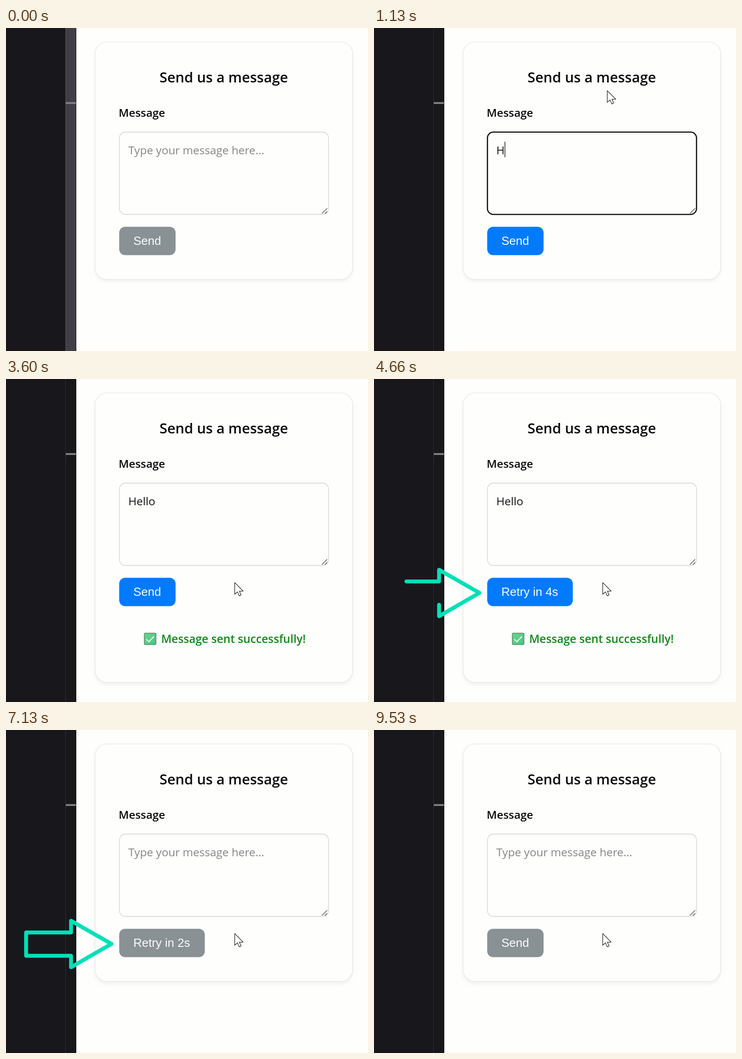
These frames come from a looping animation (793x706 px, 9600 ms). An HTML page with a canvas:

```html
<!DOCTYPE html>
<html lang="en">
<head>
<meta charset="utf-8">
<title>Send us a message</title>
<style>
  html, body { margin: 0; width: 100%; height: 100%; overflow: hidden; background: #fefefd; }
  canvas { display: block; }
</style>
</head>
<body>
<canvas id="stage" width="793" height="706"></canvas>
<script>
const ctx = document.getElementById('stage').getContext('2d');
const LOOP = 9600;
const UI = '"Open Sans", "Noto Sans", sans-serif';
const BUTTON_FONT = '26px "Liberation Sans", Arial, sans-serif';

const GREY = [138, 145, 149], BLUE = [0, 123, 255], DEEP = [0, 86, 179];
const FOCUS = 470, CLICK = 2530, SENT = 2600, CLEARED = 5665;
const RETRY = 3645, TICK = 1003;
const TYPED = [930, 1200, 1330, 1600, 1800];
const BUTTON_COLORS = [[930, BLUE], [2430, DEEP], [2670, BLUE], [CLEARED, GREY]];

// Pointer stops: time, x, y
const POINTER = [
  [30, -30, 300], [430, 440, 290], [500, 445, 285], [730, 511, 137],
  [2200, 511, 137], [2500, 362, 460], [2600, 364, 458], [2670, 371, 452], [3100, 501, 445]
];

const ARROW = [
  [142.5, 493.5], [142.5, 518.5], [231, 467.5], [142.5, 417],
  [142.5, 442.5], [44, 442.5], [44, 493.5]
];

const arrowPath = polygon(ARROW);
const arrowLength = ARROW.reduce((sum, p, i) => {
  const q = ARROW[(i + 1) % ARROW.length];
  return sum + Math.hypot(q[0] - p[0], q[1] - p[1]);
}, 0);
const arrowCursor = polygon([[0, 0], [0, 25.5], [6, 20.3], [10, 29], [14, 27.2], [10.3, 18.8], [18.5, 18.5]]);
const handCursor = new Path2D(
  'M-3 3Q-3 -1 0 -1Q3 -1 3 3V11Q6 9 7 13Q10 11 10 15Q13 13 13 17V24' +
  'Q12 34 4 34H0Q-5 33 -11 22Q-14 18 -11 17Q-8 16 -3 22Z');
const handLines = new Path2D('M3 11V17M7 13V18M10 15V19');

function polygon(points) {
  const path = new Path2D();
  points.forEach(([x, y]) => path.lineTo(x, y));
  path.closePath();
  return path;
}

const clamp = v => Math.min(1, Math.max(0, v));
const ease = v => 1 - Math.pow(1 - clamp(v), 2.35);
const smooth = v => v * v * (3 - 2 * v);

function rect(x, y, w, h, color) {
  ctx.fillStyle = color;
  ctx.fillRect(x, y, w, h);
}

function rounded(x, y, w, h, r) {
  ctx.beginPath();
  ctx.roundRect(x, y, w, h, r);
}

function text(str, x, y, font, color, align = 'left') {
  ctx.font = font;
  ctx.fillStyle = color;
  ctx.textAlign = align;
  ctx.fillText(str, x, y);
}

function line(x1, y1, x2, y2, color, width) {
  ctx.beginPath();
  ctx.moveTo(x1, y1);
  ctx.lineTo(x2, y2);
  ctx.strokeStyle = color;
  ctx.lineWidth = width;
  ctx.stroke();
}

function buttonColor(t) {
  let color = GREY;
  for (const [start, next] of BUTTON_COLORS) {
    if (t < start) break;
    const k = ease((t - start) / 200);
    color = color.map((c, i) => Math.round(c + (next[i] - c) * k));
  }
  return `rgb(${color})`;
}

function pointerAt(t) {
  if (t <= POINTER[0][0]) return null;
  const i = POINTER.findIndex(p => p[0] > t);
  if (i < 0) return POINTER[POINTER.length - 1].slice(1);
  const [t0, x0, y0] = POINTER[i - 1], [t1, x1, y1] = POINTER[i];
  const k = smooth((t - t0) / (t1 - t0));
  return [x0 + (x1 - x0) * k, y0 + (y1 - y0) * k];
}

function drawSidebar(t) {
  rect(0, 0, 154, 706, '#18171c');
  rect(130, 0, 1, 706, '#2f2f34');
  ctx.globalAlpha = clamp(1 - (t - 40) / 720);
  rect(130, 0, 24, 706, '#413f45');
  rect(130, 0, 1, 706, '#504e54');
  ctx.globalAlpha = 1;
  rect(153, 0, 1, 706, '#18171c');
  rect(131, 162, 22, 4, '#7d8285');
}

function drawCard(sent) {
  rounded(195, 30.5, 564.5, sent ? 632.5 : 519, 26);
  ctx.save();
  ctx.shadowColor = 'rgba(0,0,0,.05)';
  ctx.shadowBlur = 7;
  ctx.shadowOffsetY = 5;
  ctx.fillStyle = '#fefefd';
  ctx.fill();
  ctx.restore();
  ctx.strokeStyle = '#e3e3e3';
  ctx.lineWidth = 1.2;
  ctx.stroke();
  text('Send us a message', 477, 118.5, '600 31px ' + UI, '#0a0a0a', 'center');
  text('Message', 246.8, 194, '600 24.3px ' + UI, '#0a0a0a');
}

function drawField(t) {
  const focused = t >= FOCUS && t < CLICK;
  const count = t < CLEARED ? TYPED.filter(s => t >= s).length : 0;
  const value = 'Hello'.slice(0, count);

  rounded(248.5, 227.5, 458, 180, 13);
  ctx.strokeStyle = focused ? '#101010' : '#d0d0d0';
  ctx.lineWidth = focused ? 2.6 : 1.3;
  ctx.stroke();

  line(692, 405.5, 703.5, 394, '#555', 1.5);
  if (!focused) line(698.5, 406, 703.5, 401, '#555', 1.5);

  text(value || 'Type your message here...', 268, 276, '24.5px ' + UI, value ? '#141414' : '#858585');
  if (focused) {
    const x = 268 + (value ? ctx.measureText(value).width : 0);
    rect(x, 248.5, 1.4, 34, '#111');
  }
}

function drawButton(t) {
  const left = 5 - Math.floor((t - RETRY) / TICK);
  const waiting = t >= RETRY && left > 0;
  rounded(248, 434.5, waiting ? 187.5 : 123.5, 62, 13);
  ctx.fillStyle = buttonColor(t);
  ctx.fill();
  text(waiting ? `Retry in ${left}s` : 'Send', 279, 473.5, BUTTON_FONT, '#fbfcfc');
}

function drawNotice() {
  const fill = ctx.createLinearGradient(303, 555, 328, 581);
  fill.addColorStop(0, '#6fd58f');
  fill.addColorStop(1, '#45c583');
  rounded(303, 555.5, 25.5, 25, 2);
  ctx.fillStyle = fill;
  ctx.fill();
  ctx.strokeStyle = '#4f8a68';
  ctx.lineWidth = 1.5;
  ctx.stroke();
  ctx.beginPath();
  ctx.moveTo(307.5, 569);
  ctx.lineTo(313, 574.5);
  ctx.lineTo(324, 562.5);
  ctx.strokeStyle = '#f2fbf4';
  ctx.lineWidth = 2.2;
  ctx.stroke();
  text('Message sent successfully!', 340, 577, '600 24.7px ' + UI, '#128a1a');
}

function drawArrow(t) {
  const drawn = clamp((t - 4035) / 965);
  const alpha = clamp((8660 - t) / 580);
  if (!drawn || !alpha) return;
  ctx.save();
  ctx.globalAlpha = alpha;
  ctx.strokeStyle = '#00e0b8';
  ctx.lineWidth = 8.5;
  ctx.lineJoin = ctx.lineCap = 'round';
  if (drawn < 1) ctx.setLineDash([arrowLength * drawn, arrowLength]);
  ctx.stroke(arrowPath);
  ctx.restore();
}

function drawPointer(t) {
  const at = pointerAt(t);
  if (!at) return;
  const [x, y] = at;
  const overField = x > 248 && x < 707 && y > 227 && y < 408;
  const overButton = x > 248 && x < 371.5 && y > 434 && y < 497;
  ctx.save();
  ctx.translate(x, y);
  ctx.fillStyle = '#fff';
  ctx.strokeStyle = '#333';
  ctx.lineWidth = 1.4;
  ctx.lineJoin = 'round';
  if (overField) {
    line(0, -13, 0, 13, '#333', 1.5);
    line(-4, -13, 4, -13, '#333', 1.5);
    line(-4, 13, 4, 13, '#333', 1.5);
  } else {
    const shape = overButton ? handCursor : arrowCursor;
    ctx.fill(shape);
    ctx.stroke(shape);
    if (overButton) ctx.stroke(handLines);
  }
  ctx.restore();
}

function draw(t) {
  const sent = t >= SENT && t < CLEARED;
  rect(0, 0, 793, 706, '#fefefd');
  drawSidebar(t);
  drawCard(sent);
  drawField(t);
  drawButton(t);
  if (sent) drawNotice();
  drawArrow(t);
  drawPointer(t);
}

const began = performance.now();
function frame() {
  draw((performance.now() - began) % LOOP);
  requestAnimationFrame(frame);
}
frame();
</script>
</body>
</html>
```
